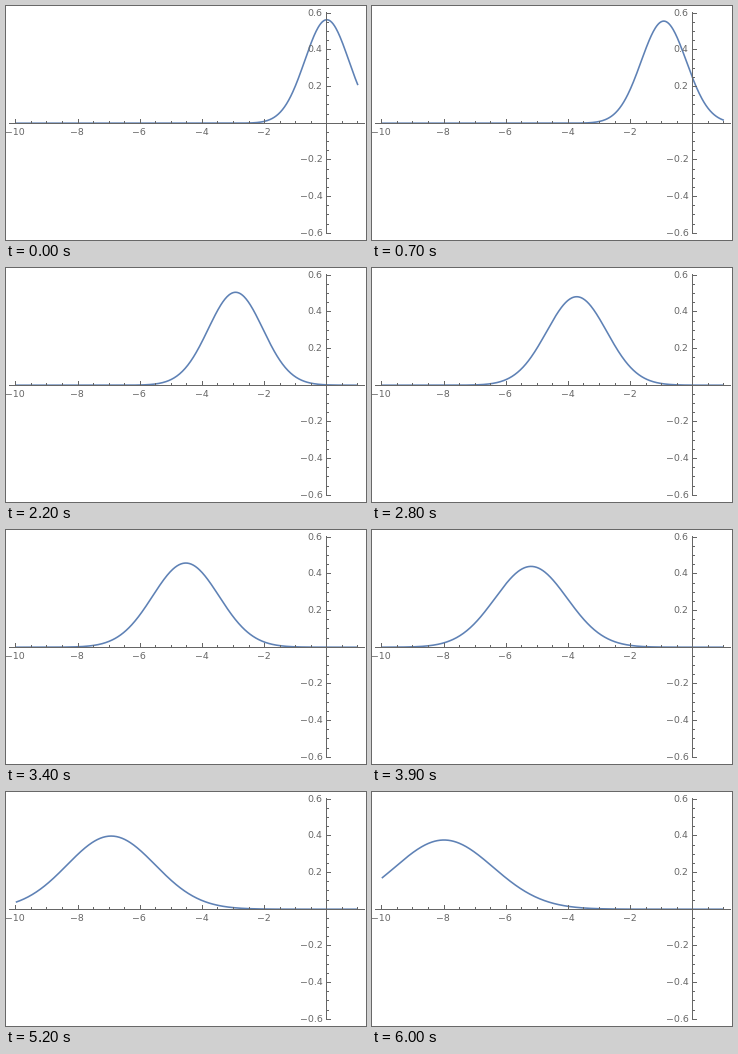
Animation of 360x234 px, one loop 6.1 s. Source, as a matplotlib script:

```python
import numpy as np
import matplotlib.pyplot as plt
from matplotlib.animation import FuncAnimation

W, H, DPI = 360, 234, 72
FRAMES, INTERVAL = 61, 100
X0, Y0 = 320.8, 117.2          # pixel position of the origin
SX, SY = 31.1, 183.4           # pixels per unit
GRAY, BLUE = "#666666", "#5e81b5"

plt.rcParams["font.family"] = "DejaVu Sans"


def px(x):
    return X0 + SX * x


def py(y):
    return Y0 - SY * y


def packet(x, t):
    """Gaussian that drifts left and spreads, t from 0 to 2."""
    spread = 1 + t**2
    return np.exp(-(x + 4 * t) ** 2 / spread) / (np.sqrt(np.pi) * spread**0.25)


def crisp(v):
    """Centre of the pixel that holds v."""
    return np.floor(v) + 0.5


def segment(xs, ys):
    ax.plot(xs, ys, color=GRAY, lw=1, solid_capstyle="butt",
            snap=False, zorder=3)


def label(x, y, value, digits, ha):
    text = f"{value:.{digits}f}".replace("-", "\u2212")
    ax.text(x, y, text, size=9.4, color=GRAY, ha=ha,
            va="center_baseline", zorder=4)


fig = plt.figure(figsize=(W / DPI, H / DPI), dpi=DPI, facecolor="white")
ax = fig.add_axes([0, 0, 1, 1])
ax.set(xlim=(0, W), ylim=(H, 0))
ax.axis("off")

# Axis lines
base, stem = crisp(Y0), crisp(X0)
segment([3, 359], [base, base])
segment([stem, stem], [6, 228])

# Horizontal ticks, every half unit with a label every two
for i in range(-20, 3):
    if i == 0:
        continue
    major = i % 4 == 0
    x = crisp(px(i / 2))
    segment([x, x], [base, base - (4.5 if major else 2.5)])
    if major:
        label(px(i / 2) - 0.8, 125.3, i / 2, 0, "center")

# Vertical ticks, every 0.05 with a label every 0.2
for i in range(-12, 13):
    if i == 0:
        continue
    major = i % 4 == 0
    y = crisp(py(i / 20))
    segment([stem, stem + (4.5 if major else 2.5)], [y, y])
    if major:
        label(316.6, py(i / 20) - 0.9, i / 20, 1, "right")

xs = np.linspace(-10, 1, 500)
curve, = ax.plot([], [], color=BLUE, lw=1.6, solid_capstyle="butt",
                 snap=False, zorder=2)


def update(frame):
    t = 2 * frame / (FRAMES - 1)
    curve.set_data(px(xs), py(packet(xs, t)))
    return curve,


anim = FuncAnimation(fig, update, frames=FRAMES, interval=INTERVAL,
                     repeat=True, repeat_delay=0)
plt.show()
```
